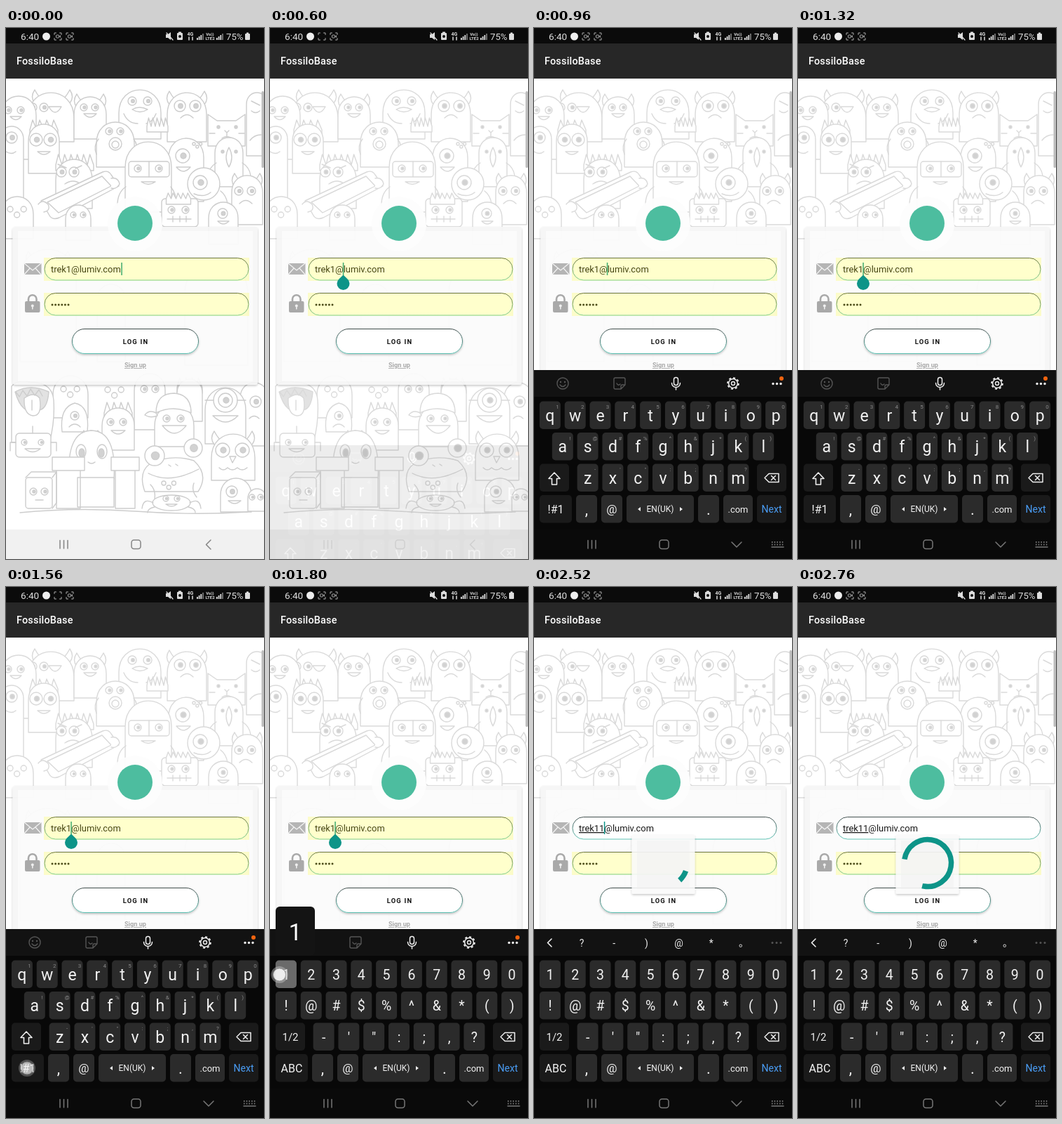
These frames come from a looping animation (368x756 px, 2.88 s). An HTML page:

```html
<!DOCTYPE html>
<html lang="en">
<head>
<meta charset="utf-8">
<title>Login</title>
<style>
  html, body { margin: 0; height: 100%; overflow: hidden; background: #fff; }
  svg { display: block; width: 368px; height: 756px; font-family: Roboto, sans-serif; }
  .line { fill: none; stroke-linecap: round; stroke-linejoin: round; }
  .mid { text-anchor: middle; }
  #doodles { fill: #fff; stroke-width: 1.4; stroke-linejoin: round; stroke-linecap: round; }
</style>
</head>
<body>
<svg viewBox="0 0 368 756">
  <defs>
    <linearGradient id="edge" x2="0" y2="1">
      <stop stop-color="#2f3d3c"/><stop offset="1" stop-color="#4dbdad"/>
    </linearGradient>
    <filter id="shade" x="-10%" y="-10%" width="120%" height="130%">
      <feDropShadow dx="0" dy="1.5" stdDeviation="1.6" flood-opacity=".25"/>
    </filter>
  </defs>
  <g id="doodles"></g>
  <g id="app"></g>
  <g id="live"></g>
</svg>
<script>
const TEAL = '#0d9488', STEP = 120, STEPS = 24;
const $ = id => document.getElementById(id);
const rect = (x, y, w, h, r, fill, more = '') =>
  `<rect x="${x}" y="${y}" width="${w}" height="${h}" rx="${r}" fill="${fill}" ${more}/>`;
const dot = (x, y, r, fill, more = '') => `<circle cx="${x}" cy="${y}" r="${r}" fill="${fill}" ${more}/>`;
const line = (d, color, width = 1.4, more = '') =>
  `<path class="line" d="${d}" stroke="${color}" stroke-width="${width}" ${more}/>`;
const shape = (d, fill) => `<path d="${d}" fill="${fill}"/>`;
const text = (x, y, size, fill, str, more = '') =>
  `<text x="${x}" y="${y}" font-size="${size}" fill="${fill}" ${more}>${str}</text>`;
const label = (x, y, size, fill, str, more = '') => text(x, y, size, fill, str, 'class="mid" ' + more);

// Doodle parts, centred on x
const pen = d => `<path d="${d}"/>`;
const open = d => shape(d, 'none');
const body = (x, top, w, h) => {
  const k = Math.min(h, w * .55), l = x - w / 2, r = x + w / 2;
  return pen(`M${l} ${top + h}V${top + k}C${l} ${top - k * .33} ${r} ${top - k * .33} ${r} ${top + k}V${top + h}Z`);
};
const eye = (x, y, r) => dot(x, y, r, '#fff') + dot(x + 1, y, r * .4, '#d2d2d2');
const eyes = (x, y, gap, r) => eye(x - gap, y, r) + eye(x + gap, y, r);
const mouth = (x, y, w, depth) => pen(`M${x - w} ${y}Q${x} ${y + depth} ${x + w} ${y}Z`);
const frown = (x, y, w) => open(`M${x - w} ${y}q${w} ${-w} ${2 * w} 0`);
const horns = (x, y, gap) => [-1, 1].map(k =>
  pen(`M${x + k * (gap - 5)} ${y}Q${x + k * gap} ${y - 6} ${x + k * (gap + 3)} ${y - 12}Q${x + k * (gap + 10)} ${y - 2} ${x + k * (gap + 3)} ${y + 7}`)).join('');
const spikes = (x, y, n, w = 9, h = 12) => {
  let d = `M${x - n * w / 2} ${y}`;
  for (let i = 0; i < n; i++) d += `l${w * .4} ${-h}l${w * .6} ${h}`;
  return pen(d + 'v8h' + -n * w + 'z');
};
const spots = (x, y, r) => [0, 1, 2].map(i => dot(x + i * r * 2.4, y + i % 2 * r * 2, r, 'none')).join('');

const upperCrowd = () =>
  horns(66, 100, 22) + body(64, 92, 66, 70) + eyes(46, 113, 8, 6) + mouth(70, 112, 9, 16)
  + body(18, 97, 50, 90) + eyes(12, 117, 9, 5) + mouth(14, 126, 8, 9)
  + horns(120, 106, 16) + body(120, 98, 46, 60) + eyes(119, 113, 8, 5) + mouth(120, 122, 9, 10)
  + body(191, 88, 60, 70) + eyes(191, 104, 11, 6) + pen('M180 116q10 -6 22 0q-11 7 -22 0z') + open('M168 122q6 14 20 14M214 122q-5 12 -14 14')
  + horns(258, 102, 22) + body(258, 92, 56, 70) + eyes(259, 111, 11, 8) + frown(258, 128, 9)
  + pen('M288 168V123L301 132H328L341 123V168Z') + dot(303, 141, 2, '#d2d2d2') + dot(328, 141, 2, '#d2d2d2')
  + open('M312 146l3 3l3 -3M315 149v6M308 157q7 -5 14 0M290 150h8M332 150h8')
  + body(358, 92, 30, 90) + open('M350 104l12 6M350 118q6 5 12 0M348 160q6 -8 16 -8')
  + body(8, 140, 34, 120) + eye(8, 156, 8) + open('M0 176q8 5 14 0')
  + spikes(54, 145, 4, 10, 14) + body(54, 137, 44, 70) + eyes(53, 159, 10, 9) + mouth(54, 176, 9, 8)
  + spikes(216, 140, 5, 6, 12) + body(156, 134, 54, 64) + eyes(155, 147, 8, 5) + dot(156, 165, 9, '#fff') + dot(156, 166, 5, 'none')
  + open('M132 158q-8 10 -3 22M182 158q8 10 2 22')
  + body(257, 157, 50, 90) + eye(252, 182, 10) + mouth(253, 198, 10, 12) + spots(268, 165, 2)
  + body(318, 156, 40, 70) + dot(309, 176, 2, '#d2d2d2') + dot(328, 176, 2, '#d2d2d2') + pen('M318 170q8 14 0 28q-8 -14 0 -28z')
  + open('M300 192q-10 6 -12 18M337 192q10 6 12 18')
  + spikes(98, 195, 6, 9, 15) + body(97, 187, 52, 70) + eyes(88, 205, 9, 7) + open('M74 194l12 5M108 196l-9 4M84 222q12 -8 22 0')
  + body(203, 162, 66, 100) + rect(175, 190, 58, 22, 4, '#fff') + open('M204 190v22') + eyes(203, 200, 15, 5)
  + mouth(203, 219, 10, 7) + open('M171 226q-12 8 -12 26M235 226q8 10 8 24')
  + dot(282, 222, 23, '#fff') + eye(277, 220, 10) + open('M268 236q14 6 24 -2M306 232q8 6 10 18')
  + horns(344, 219, 15) + body(344, 210, 44, 70) + eyes(341, 232, 9, 6) + frown(342, 250, 9)
  + pen('M50 246L138 205Q146 202 150 209L161 225L76 270Q66 274 62 267Z') + pen('M59 248L137 211L150 225L75 263Z')
  + pen('M46 251q6 -8 14 0q4 9 -6 11M150 214q10 -2 12 8q-4 8 -12 6')
  + body(16, 240, 46, 60) + spots(6, 258, 4) + body(103, 252, 36, 50) + eyes(103, 266, 7, 4)
  + rect(222, 243, 52, 40, 5, '#fff') + spikes(246, 243, 5, 7, 8) + eyes(246, 259, 10, 5) + open('M230 272h34M238 268v8M248 268v8M257 268v8')
  + body(310, 248, 42, 60) + eye(309, 264, 7) + mouth(310, 275, 8, 8)
  + horns(60, 330, 25) + body(60, 315, 80, 160) + body(150, 365, 40, 110) + body(300, 330, 90, 150);

const lowerCrowd = () =>
  body(92, 495, 50, 60) + spots(82, 514, 4) + body(205, 492, 44, 80) + eyes(205, 514, 8, 5) + spots(145, 515, 4)
  + spikes(262, 512, 4, 9, 14) + body(262, 500, 36, 60) + body(354, 505, 40, 90) + eye(356, 532, 8) + frown(354, 556, 7)
  + pen('M8 590V510Q16 500 34 504Q66 504 68 530Q70 560 62 590Z') + shape('M13 518q22 -12 48 0q-2 28 -18 26q-20 8 -30 -26z', '#e2e2e2')
  + pen('M26 527q14 -10 22 0q4 26 -10 25q-13 -2 -12 -25z') + open('M37 530v14M14 518l5 7l5 -9l6 8l5 -10l6 9l6 -8l5 9')
  + pen('M80 575Q76 540 98 534Q120 538 116 575Z') + eye(98, 552, 6) + frown(98, 568, 8)
  + spikes(160, 548, 4, 10, 15) + body(160, 541, 46, 60) + eyes(158, 561, 9, 5) + mouth(160, 573, 10, 10)
  + body(240, 536, 56, 60) + pen('M214 548Q214 520 240 520Q264 522 264 548Q238 536 214 548Z') + pen('M214 548q-10 -5 -16 3q8 5 18 1z')
  + eyes(239, 556, 10, 5) + mouth(240, 566, 17, 22)
  + body(313, 512, 58, 80) + dot(313, 530, 17, '#fff') + eye(313, 530, 10) + open('M284 530h12M330 530h12') + mouth(313, 552, 18, 18)
  + rect(14, 577, 50, 34, 5, '#fff') + eyes(38, 590, 12, 4) + mouth(38, 599, 11, 9) + open('M38 577v-10M14 590h-8v12M64 590h8v12')
  + spikes(122, 583, 3, 10, 10) + pen('M90 642Q86 574 122 573Q158 574 154 642Z')
  + [-1, 1].map(k => `<ellipse cx="${122 + k * 15}" cy="603" rx="7" ry="10"/><ellipse cx="${122 + k * 14}" cy="605" rx="4" ry="6" fill="#d2d2d2"/>`).join('')
  + open('M117 618q5 4 10 0M90 612q-8 4 -8 14M154 612q8 4 8 14')
  + pen('M72 630H106V684H72ZM66 611H112V630H66ZM102 640H154V682H102ZM150 611H190V630H150ZM156 630H184V684H156Z')
  + rect(28, 640, 38, 44, 4, '#fff') + open('M28 640l8 -8h36l-6 8M72 632v44l-6 8') + eyes(47, 660, 8, 5) + open('M42 672h11')
  + horns(324, 586, 24) + body(324, 578, 62, 66) + eyes(323, 601, 14, 10) + pen('M319 610l4 9l5 -9z') + open('M304 626q6 6 12 0q7 6 14 0q7 6 14 0')
  + pen('M198 660Q188 632 206 620Q236 606 268 616Q290 636 274 660Z') + eye(212, 609, 14) + eye(267, 598, 13)
  + open('M203 634q30 16 72 -6M232 622l3 2M242 621l3 2M206 650q8 8 6 20M268 648q-4 10 4 20') + spots(225, 648, 3)
  + `<ellipse cx="236" cy="676" rx="27" ry="11"/>` + eyes(236, 670, 8, 4) + mouth(236, 678, 8, 6)
  + open('M210 676q-14 -8 -16 8M212 682q-10 2 -10 8M262 676q14 -8 16 8M260 682q10 2 10 8')
  + body(328, 641, 44, 48) + eye(322, 660, 8) + mouth(326, 673, 9, 8) + body(358, 656, 26, 32) + eyes(357, 668, 6, 4)
  + open('M20 690Q100 682 184 688T345 689');
$('doodles').innerHTML = upperCrowd() + lowerCrowd();

const signal = x => [3, 5, 7, 9].map((h, i) => rect(x + i * 2.7, 17 - h, 1.8, h, 0, i > 2 ? '#777' : '#ddd')).join('');
const pill = y => rect(55, y + .5, 291, 31.5, 15.7, '#fff', 'stroke="url(#edge)" stroke-width=".9"');
// Autofill tint lies over a whole field, its border and its text
const tint = y => rect(54, y, 293, 33, 0, '#ff0', 'opacity=".2"');

$('app').innerHTML =
  rect(0, 0, 368, 22, 0, '#0b0b0b') + rect(0, 22, 368, 50, 0, '#272727')
  + text(15, 52, 14.4, '#fff', 'FossiloBase', 'font-weight="500" letter-spacing=".2"')
  + text(21, 17, 13.6, '#ddd', '6:40') + dot(57.5, 12, 5.5, '#eee')
  + shape('M228 9h3l4 -3v11l-4 -3h-3z', '#ddd') + line('M229 7L238 17', '#ddd', 1.3)
  + rect(244, 7, 8, 10, 1, '#ddd') + rect(246, 5.5, 4, 2, 0, '#ddd') + dot(248, 12, 2, '#111')
  + label(263, 11, 7, '#ddd', '4G', 'font-weight="700"') + line('M261 17v-4M266 13v4', '#ddd', 1.5)
  + signal(272) + label(291, 11, 6, '#ddd', 'Vo))', 'font-weight="700"')
  + label(291, 17, 6, '#ddd', 'LTE2', 'font-weight="700"') + signal(300)
  + text(314, 17, 13.2, '#ddd', '75%') + rect(341, 8, 7, 9, 1, '#ddd') + rect(343, 6.5, 3, 2, 0, '#ddd')
  + rect(364.5, 90, 3.5, 109, 1.5, '#bdbdbd')
  + rect(9.5, 283, 349.5, 225, 4, '#f6f6f6', 'opacity=".9" filter="url(#shade)"')
  + rect(17, 289, 335, 214, 0, '#fff', 'opacity=".55"')
  + dot(184, 279, 39, '#fdfdfd', 'opacity=".95"') + dot(184, 278, 25, '#4dbd9f')
  + rect(26, 335, 24.5, 16, 0, '#b5b5b5') + line('M26 335L38 345L50 335M26 351L34 342M50 351L42 342', '#f4f4f4', 1.2)
  + rect(27, 389, 21.5, 16, 2, '#a9a9a9') + line('M32 389V386a5.7 5.7 0 0 1 11.5 0V389', '#a9a9a9', 2.6)
  + dot(37.8, 395.5, 2, '#eee') + line('M37.8 396V400', '#eee', 1.6)
  + pill(377) + [...'123456'].map((_, i) => dot(66 + i * 4.6, 394, 1.5, '#222')).join('') + tint(377)
  + rect(94.5, 428.5, 180, 35, 17.5, '#fff', 'stroke="url(#edge)" stroke-width=".9" filter="url(#shade)"')
  + label(185, 449.5, 9.4, '#111', 'LOG IN', 'font-weight="700" letter-spacing="1.2"')
  + label(184.5, 483, 9.2, '#aaa', 'Sign up', 'font-weight="700" text-decoration="underline"');

function nav(dark, ink = dark ? '#777' : '#858585') {
  return rect(0, 714, 368, 42, 0, dark ? '#0a0a0a' : '#f1f1f1')
    + line('M77 729.5V741M82.5 729.5V741M88 729.5V741', ink, 1.5)
    + rect(179, 729, 13, 12.5, 3.5, 'none', `stroke="${ink}" stroke-width="1.5"`)
    + line(dark ? 'M282 732L289 739L296 732' : 'M292 729L285.5 735.5L292 742', ink, 1.5)
    + (dark ? line('M339 732H356M339 735.5H356', ink, 2, 'stroke-dasharray="1.5 2.2" style="stroke-linecap:butt"')
      + line('M339 739H356', ink, 1.5) : '');
}

const key = (x, y, w, fill = '#2b2b2b') => rect(x, y, w, 39.5, 5, fill);
function keyboard(numeric, symbols, pressed) {
  const rows = numeric ? ['1234567890', '!@#$%^&*()', `-'":;,?`] : ['qwertyuiop', 'asdfghjkl', 'zxcvbnm'];
  const hints = ['1234567890', '!@#%^&*()', `-'":;,?`];
  let s = rect(0, 487, 368, 269, 0, '#080808') + rect(0, 487, 368, 38, 0, '#121212');
  if (symbols) {
    s += line('M25 501L19.5 506.5L25 512', '#eee', 1.6)
      + [...'?-)@*。'].map((c, i) => label(68 + i * 46.2, 511.5, 14, '#eee', c)).join('')
      + [340, 346, 352].map(x => dot(x, 506.5, 1.5, '#555')).join('');
  } else {
    s += dot(41, 506, 8, 'none', 'stroke="#555" stroke-width="1.4"') + dot(38, 504, 1.2, '#555') + dot(44, 504, 1.2, '#555')
      + line('M37 508q4 5 8 0', '#555')
      + line('M114 500q0 -2 2 -2h12q2 0 2 2v8l-6 6h-8q-2 0 -2 -2zM130 508h-4q-2 0 -2 2v4M118 506q2 4 5 1', '#555')
      + rect(199.5, 497.5, 6, 11, 3, 'none', 'stroke="#eee" stroke-width="1.5"')
      + line('M196.5 505.5a6 6 0 0 0 12 0M202.5 511.5V515', '#eee', 1.5)
      + dot(284, 506, 6.4, 'none', 'stroke="#eee" stroke-width="1.5"') + dot(284, 506, 2.5, 'none', 'stroke="#eee" stroke-width="1.4"')
      + dot(284, 506, 7.9, 'none', 'stroke="#eee" stroke-width="1.8" pathLength="16" stroke-dasharray="1 1"')
      + [341, 346.5, 352].map(x => dot(x, 506.5, 1.7, '#eee')).join('') + dot(353, 499, 3, '#f0640f');
  }
  rows.forEach((row, r) => [...row].forEach((c, i) => {
    const x = 184 + (i - (row.length - 1) / 2) * 35.8, y = 531.5 + r * 44.5;
    s += key(x - 15, y, 30, pressed === c ? '#6a6a6a' : '#2b2b2b')
      + label(x, y + (numeric ? 27 : 28), numeric ? 19.5 : 23, '#f2f2f2', c);
    if (!numeric) s += label(x + 10.5, y + 10.5, 8, '#888', hints[r][i]);
  }));
  s += key(8, 620.5, 42, '#1a1a1a') + key(318, 620.5, 42, '#1a1a1a')
    + (numeric ? label(29, 646, 15, '#eee', '1/2')
      : line('M29 633L37 641.5H32.5V650H25.5V641.5H21Z', '#eee', 1.6))
    + line('M329 640.5L335 634.5H349V646.5H335ZM338.5 637.5L344.5 643.5M344.5 637.5L338.5 643.5', '#eee', 1.5);
  const bottom = [[8, 46, numeric ? 'ABC' : '!#1', 16], [60, 30, ',', 22], [96, 30, '@', 17], [132, 96, 'EN(UK)', 12],
    [234, 30, '.', 22], [270, 42, '.com', 13], [318, 42, 'Next', 14]];
  bottom.forEach(([x, w, str, size], i) => {
    const next = i === 6;
    s += key(x, 665, w, next || !i ? '#1a1a1a' : '#2b2b2b') + label(x + w / 2, 685 + size * .36, size, next ? '#4a9df5' : '#f2f2f2', str);
  });
  return s + shape('M152 682V688L148 685ZM208 682V688L212 685Z', '#eee');
}

const clamp = v => Math.min(1, Math.max(0, v));
const ease = v => (v = clamp(v), v * v * (3 - 2 * v));
function spinner(p) {
  const c = p % 1, tail = 270 * ease(2 * c - 1), length = 270 * ease(2 * c) - tail + 16;
  const start = Math.floor(p) * 504 + 234 * c + tail - 98;
  return rect(139.5, 353, 90, 84, 2, '#fafafa', 'opacity=".88" filter="url(#shade)"')
    + rect(147, 361, 75, 69, 0, '#eee', 'opacity=".4"')
    + dot(185, 393, 33.5, 'none', `stroke="${TEAL}" stroke-width="7.5" pathLength="360" stroke-dasharray="${length} 400" transform="rotate(${start} 185 393)"`);
}
const touch = (x, y, alpha) => dot(x, y, 12, '#ccc', `opacity="${alpha * .5}"`) + dot(x, y, 9, '#fff', `opacity="${alpha}" stroke="#999"`);

function live(n) {
  const typed = n >= 16, numeric = n >= 14;
  const caret = n < 5 ? 165 : n < 10 ? 104.5 : typed ? 100.5 : 93;
  const handle = n === 5 || (n >= 10 && !typed);
  const bracket = x => line(`M${x} 9.5V7H${x + 2.5}M${x + 7.5} 7H${x + 10}V9.5M${x + 10} 14.5V17H${x + 7.5}M${x + 2.5} 17H${x}V14.5`, '#aaa', 1);
  const camera = x => rect(x + 2.5, 10, 4, 4, 1, 'none', 'stroke="#aaa"') + shape(`M${x + 7} 12l2 -2v4z`, '#aaa');
  let s = bracket(69) + bracket(86) + camera(86) + (n % 7 < 5 ? camera(69) : '')
    + pill(327) + text(64, 348, 12.9, '#181818', typed
      ? '<tspan text-decoration="underline">trek11</tspan>@lumiv.com' : 'trek1@lumiv.com');
  if (n % 7 !== 2 && n % 7 !== 3) s += rect(caret - .7, 334, 1.5, 18, 0, TEAL);
  if (!typed) s += tint(327);
  if (handle) s += shape(`M${caret} 351.5l6.2 6a9 9 0 1 1 -12.4 0z`, TEAL);
  if (n >= 18) s += spinner((n - 18) * .3125);
  if (n < 5) s += nav(false);
  if (n === 5) s += nav(false, '#ddd') + `<g opacity=".07" transform="translate(0 107)">${keyboard()}</g>`;
  if (n >= 6) s += `<g transform="translate(0 ${n === 6 ? 4 : 0})">${keyboard(numeric, typed, n === 15 && '1')}</g>` + nav(true);
  if (n === 15) s += rect(8, 455, 56, 70, 6, '#141414') + label(36, 503, 33, '#fff', '1');
  if (n === 4) s += touch(104, 344, .5);
  if (n === 9) s += touch(94, 344, .5);
  if (n === 13) s += touch(30, 685, .6);
  if (n === 15) s += touch(13.5, 552, .85);
  if (n === 17) s += touch(258, 433, .6);
  if (n === 18) s += dot(258, 433, 9.5, 'none', 'stroke="#c4cbd2" stroke-width="1.3"');
  return s;
}

let shown = -1;
function draw(now) {
  const n = Math.floor(now / STEP) % STEPS;
  if (n !== shown) {
    shown = n;
    $('doodles').setAttribute('stroke', n < 5 ? '#cdcdcd' : '#dadada');
    $('live').innerHTML = live(n);
  }
  requestAnimationFrame(draw);
}
draw(performance.now());
</script>
</body>
</html>
```
